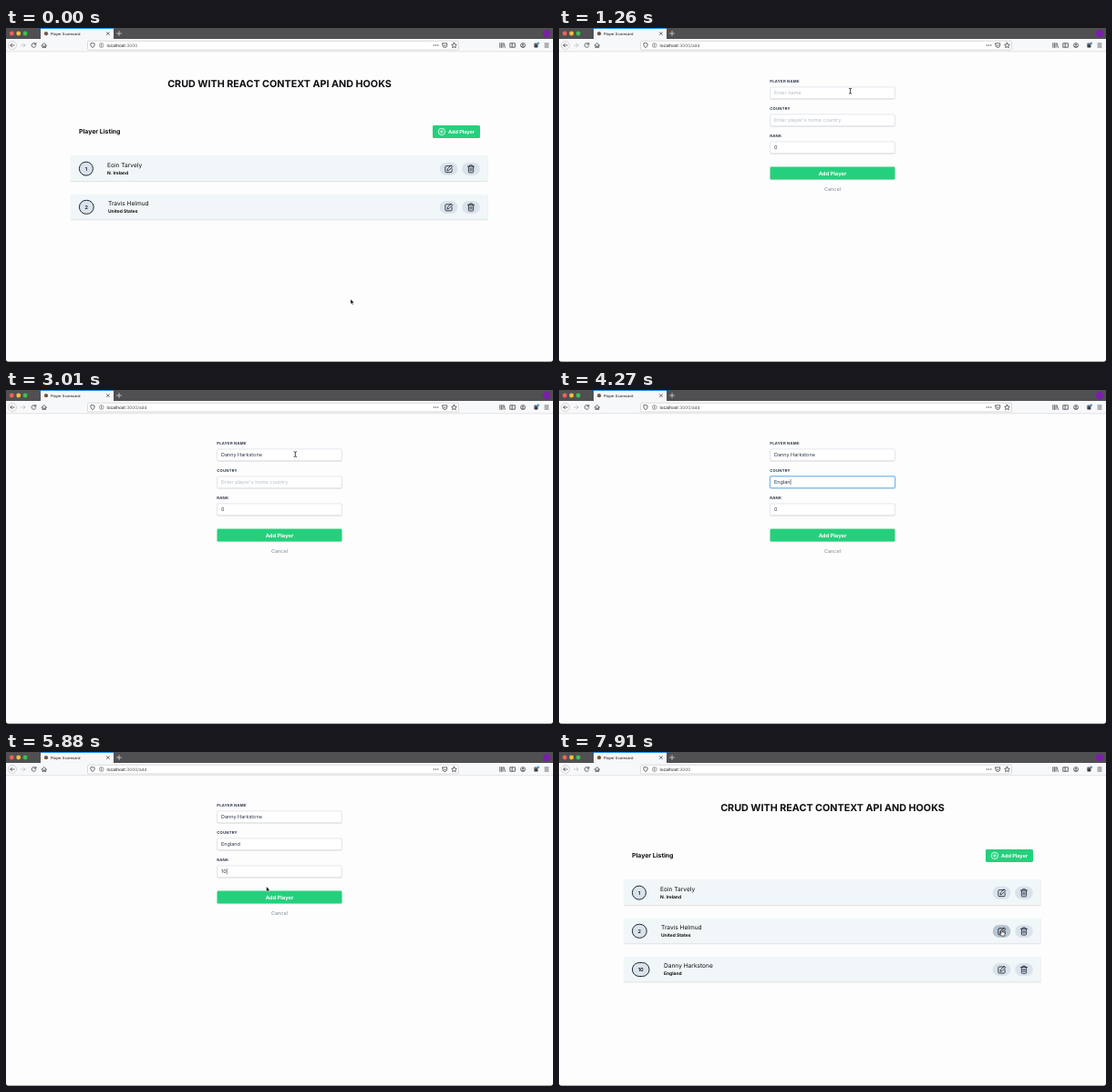
These frames come from a looping animation (600x367 px, 8 s). An HTML page:

```html
<!DOCTYPE html>
<html lang="en">
<head>
<meta charset="utf-8">
<title>Player Scorecard</title>
<style>
html, body { margin: 0; width: 100%; height: 100%; overflow: hidden; background: #fdfdfd; }
svg { display: block; width: 100vw; height: 100vh; }
text { font-family: Inter, "Open Sans", sans-serif; white-space: pre; fill: #0c0d10; text-rendering: geometricPrecision; }
.b { font-weight: 700; }
.s { font-weight: 600; }
.label { font-weight: 700; font-size: 4.2px; letter-spacing: .22px; fill: #2d3748; }
.field { font-size: 5.5px; }
.line { fill: none; stroke: #3a3a40; stroke-width: .75; stroke-linecap: round; stroke-linejoin: round; }
</style>
</head>
<body>
<svg id="stage" viewBox="0 0 600 367" preserveAspectRatio="none"></svg>
<script>
const LOOP = 8000, STEP = 70;
const GREEN = '#25d07d', DARK_GREEN = '#20bf72', PILL = '#dae3ec', DARK_PILL = '#b9c4d1';

const rect = (x, y, w, h, fill, r = 0, more = '') =>
  `<rect x="${x}" y="${y}" width="${w}" height="${h}" rx="${r}" fill="${fill}" ${more}/>`;
const dot = (x, y, r, fill, more = '') => `<circle cx="${x}" cy="${y}" r="${r}" fill="${fill}" ${more}/>`;
const line = (d, more = '') => `<path class="line" d="${d}" ${more}/>`;
const text = (x, y, size, str, cls = '', more = '') =>
  `<text x="${x}" y="${y}" font-size="${size}" class="${cls}" ${more}>${str}</text>`;
const at = (x, y, inner) => `<g transform="translate(${x} ${y}) scale(1.1)">${inner}</g>`;
const shadowed = (x, y, w, h, fill, r, edge) =>
  rect(x - .4, y + .2, w + .8, h + 1.1, '#000', r, 'opacity=".04"') +
  rect(x, y + .2, w, h + .5, '#000', r, 'opacity=".08"') +
  rect(x, y, w, h, fill, r, edge ? `stroke="${edge}" stroke-width=".7"` : '');

const chrome =
  rect(0, 0, 600, 12, '#505053') +
  ['#f9605a', '#f6bd3b', '#35c649'].map((c, i) => dot(6.3 + 7.4 * i, 6, 2.4, c)).join('') +
  rect(38, 0, 80, 12, '#f6f7f8') + rect(38, 0, 80, 1, '#2492f5') +
  dot(44, 6.2, 2.1, '#6e5a44') +
  text(49, 7.6, 4, 'Player Scorecard') +
  line('M110.3 4.6l3 3m0-3l-3 3') +
  line('M121.5 6h5m-2.5-2.5v5', 'style="stroke:#ddd"') +
  dot(593, 6, 4.3, '#7a1fa8') +
  rect(0, 12, 600, 14, '#f7f8f9') + rect(0, 25.6, 600, .6, '#d2d3d5') +
  dot(7, 19, 4.5, '#fff', 'stroke="#b8b8ba" stroke-width=".6"') +
  line('M9.3 19h-4.5m2-2l-2 2l2 2') +
  line('M16.5 19h4.5m-2-2l2 2l-2 2', 'opacity=".3"') +
  line('M32.6 17.7a2.4 2.4 0 1 0 .2 2M32.8 16.4v1.7h-1.8') +
  line('M39 19.2l2.8-2.6l2.8 2.6M40 18.8v2.7h1.2v-1.6h1.2v1.6h1.2v-2.7') +
  rect(89.5, 14.2, 407, 9.8, '#fff', 1.2, 'stroke="#c9cacc" stroke-width=".7"') +
  line('M95 16.5l2.1 .7v1.7q-.3 1.8-2.1 2.7q-1.8-.9-2.1-2.7v-1.7z') +
  dot(104.7, 19, 2.4, 'none', 'stroke="#666" stroke-width=".6"') + line('M104.7 18.8v1.2m0-2.3v0') +
  [469.4, 471.6, 473.8].map(x => dot(x, 19, .65, '#444')).join('') +
  line('M478.8 16.8h5v2q-.2 2.6-2.5 2.8q-2.3-.2-2.5-2.8zM480.1 18.7l1.2 1.2l1.2-1.2') +
  line('M491.5 16.2l.9 1.9l2 .2l-1.5 1.4l.4 2l-1.8-1l-1.8 1l.4-2l-1.5-1.4l2-.2z') +
  line('M541.8 16.6v4.8m1.6-4.8v4.8m1.6-4.8v4.8m1.2-4.6l1.2 4.6') +
  line('M553.2 16.8h5.2v4.4h-5.2zM555.2 17v4') +
  dot(567, 19, 2.5, 'none', 'stroke="#3a3a40" stroke-width=".7"') + dot(567, 18.3, .9, '#3a3a40') +
  line('M565.6 20.3h2.8') +
  rect(579.4, 18.2, 4, 3.3, '#3a3a40', .4) + line('M579.2 17.8h4.4m-2.2 0l-1-1.3m1 1.3l1-1.3') +
  dot(583.8, 16.8, 1.2, '#3599f2') +
  line('M591 17h4m-4 2h4m-4 2h4');

function row(i, rank, name, country, pillWidth, nameX) {
  const y = 140.5 + 42.2 * i;
  const pencil = line('M3 -2.9h-5a1 1 0 0 0-1 1v4.4a1 1 0 0 0 1 1h4.6a1 1 0 0 0 1-1v-2.6M3 -3.4l1.2 1.2l-3.7 3.7l-1.6.4l.4-1.6z', 'transform="translate(-.4 0)" style="stroke:#1a202c"');
  const bin = line('M-3.2 -2.4h6.4M-1.2 -2.5v-1.1h2.4v1.1M-2.4 -2.3v5.2a.9 .9 0 0 0 .9 .9h3a.9 .9 0 0 0 .9-.9v-5.2M-.8 -.7v2.8M.8 -.7v2.8', 'style="stroke:#1a202c"');
  return `<g id="row${i}">` + shadowed(71, y, 457.5, 27.6, '#f1f7f8', 1) +
    rect(80.4, y + 6.6, pillWidth, 15, PILL, 7.5, 'stroke="#1f2733" stroke-width="1"') +
    text(80.4 + pillWidth / 2, y + 16.3, 5.5, rank, 's', 'text-anchor="middle"') +
    text(nameX, y + 12.2, 6.6, name) + text(nameX, y + 20.2, 4.95, country, 'b') +
    rect(475.7, y + 7.2, 19.7, 14, PILL, 7, `id="edit${i}"`) + at(485.6, y + 14.3, pencil) +
    rect(500.2, y + 7.2, 19.7, 14, PILL, 7) + at(510, y + 14.2, bin) + '</g>';
}

const list = '<g id="list">' +
  text(300, 65, 10.75, 'CRUD WITH REACT CONTEXT API AND HOOKS', 'b', 'text-anchor="middle"') +
  text(80, 116.2, 6.9, 'Player Listing', 'b') +
  rect(468, 107, 52, 14, GREEN, 1.4, 'id="open"') +
  dot(477.9, 113.9, 3.7, 'none', 'stroke="#fff" stroke-width=".8"') +
  line('M476.2 113.9h3.4m-1.7-1.7v3.4', 'style="stroke:#fff"') +
  text(485, 115.9, 5.5, 'Add Player', 'b', 'style="fill:#fff"') +
  row(0, 1, 'Eoin Tarvely', 'N. Ireland', 15, 111) +
  row(1, 2, 'Travis Helmud', 'United States', 15.8, 112) +
  row(2, 10, 'Danny Harkstone', 'England', 18.6, 115) + '</g>';

const form = '<g id="form">' +
  ['PLAYER NAME', 'COUNTRY', 'RANK'].map((label, i) => {
    const y = 64.9 + 30 * i;
    return text(231.3, y - 4.9, 4.2, label, 'label') +
      shadowed(231.6, y, 136.9, 12.8, '#fff', 1.6, '#d9dfe7') +
      text(236, y + 8.4, 5.5, '', 'field', `id="field${i}"`);
  }).join('') +
  '<g id="ring">' + rect(231.3, 94.6, 137.5, 13.3, 'none', 1.8, 'stroke="#cbe4f8" stroke-width="1.8"') +
  rect(231.5, 94.8, 137.1, 12.9, 'none', 1.6, 'stroke="#62aee8" stroke-width=".8"') + '</g>' +
  rect(0, 0, .5, 6.4, '#222', 0, 'id="caret"') +
  rect(231.5, 153, 137, 14.4, '#000', 1.6, 'opacity=".06"') +
  rect(231.5, 152.5, 137, 14.1, GREEN, 1.4, 'id="send"') +
  text(300, 161.6, 5.8, 'Add Player', 'b', 'text-anchor="middle" style="fill:#fff"') +
  text(300, 178.7, 5.5, 'Cancel', '', 'text-anchor="middle" style="fill:#7f8b9b"') + '</g>';

const pointers =
  '<path id="arrow" d="M0 0v5.3l1.2-1.1l.8 1.9l1-.4l-.8-1.9h1.7z" fill="#000" stroke="#fff" stroke-width=".4"/>' +
  line('M-1.2 -2.9q1 0 1.2.7q.2-.7 1.2-.7M0 -2.2v4.4M-1.2 2.9q1 0 1.2-.7q.2.7 1.2.7', 'id="beam" style="stroke:#111"') +
  '<path id="hand" d="M-.6 -1.2q.7-.7 1.3 0v2l2.4.6q.7.3.5 1.1l-.5 2.6h-3.3l-2-2.7q.2-.9 1.6.1z" fill="#fff" stroke="#111" stroke-width=".6"/>';

document.getElementById('stage').innerHTML =
  rect(0, 0, 600, 367, '#fdfdfd') + chrome +
  text(110.6, 20.7, 4.75, '', '', 'id="url"') + list + form +
  rect(0, 366.3, 600, .7, '#8a8a8c') + '<path d="M0 364v3h3q-3 0-3-3M600 364v3h-3q3 0 3-3"/>' +
  `<g id="pointer">${pointers}</g>`;

const el = id => document.getElementById(id);
const show = (id, on) => el(id).style.display = on ? '' : 'none';
const paint = (id, colour) => el(id).setAttribute('fill', colour);

// time, x, y, pointer shape from then on
const path = [
  [0, 378, 298, 'arrow'], [70, 378, 298, 'arrow'], [490, 484, 116, 'hand'], [630, 484, 114, 'arrow'],
  [700, 484, 114, 'arrow'], [980, 319.6, 69.2, 'beam'], [1330, 319.6, 69.2, ''],
  [2940, 319.6, 69.2, 'beam'], [3010, 317.3, 70.6, 'beam'], [3290, 290, 101, 'beam'], [3570, 290, 101, ''],
  [4690, 290, 101, 'beam'], [4900, 285, 131, 'beam'], [5250, 285, 131, ''], [5530, 285, 131, 'beam'],
  [5740, 285, 131, 'beam'], [5880, 285.6, 148, 'arrow'], [5950, 286.5, 153, 'hand'], [6160, 288.8, 156.5, 'hand'],
  [6440, 288.8, 156.5, 'arrow'], [7350, 288.8, 156.5, 'arrow'], [7630, 400, 117, 'arrow'],
  [7840, 483, 192, 'hand'], [7910, 485.6, 197, 'hand'], [LOOP, 485.6, 197, 'hand']
];
const nameKeys = [1330, 1470, 1540, 1610, 1680, 1820, 1890, 2100, 2240, 2310, 2450, 2660, 2730, 2800, 2870];
const countryKeys = [3570, 3780, 3920, 4060, 4200, 4270, 4410];
const typed = (str, keys, t) => str.slice(0, keys.filter(k => k <= t).length);

function setField(i, value, hint) {
  const field = el('field' + i);
  field.textContent = value || hint;
  field.style.fill = value ? '#2d3748' : '#b4bdc9';
}

function movePointer(t) {
  const i = path.findIndex(p => p[0] > t) - 1;
  const [t0, x0, y0, shape] = path[i], [t1, x1, y1] = path[i + 1];
  const u = (t - t0) / (t1 - t0), k = u * u * (3 - 2 * u);
  el('pointer').setAttribute('transform', `translate(${x0 + (x1 - x0) * k} ${y0 + (y1 - y0) * k})`);
  for (const id of ['arrow', 'beam', 'hand']) show(id, id === shape);
  return shape;
}

function draw(t) {
  const adding = t >= 630 && t < 6370;
  show('list', !adding);
  show('form', adding);
  show('row2', t >= 6370);
  el('url').innerHTML = 'localhost<tspan style="fill:#555">:3000' + (adding ? '/add' : '') + '</tspan>';

  const hover = movePointer(t) === 'hand';
  paint('open', hover && t < 630 ? DARK_GREEN : GREEN);
  paint('send', hover && t < 6370 ? DARK_GREEN : GREEN);
  paint('edit1', hover && t > 7000 ? DARK_PILL : PILL);
  if (!adding) return;

  setField(0, typed('Danny Harkstone', nameKeys, t), 'Enter name');
  setField(1, typed('England', countryKeys, t), "Enter player's home country");
  setField(2, t < 5250 ? '0' : typed('10', [5390, 5530], t), '');
  el('ring').style.opacity = t < 4900 ? Math.min(1, Math.max(0, (t - 3290) / 140)) : 0;

  const focus = t < 3360 ? 0 : t < 4900 ? 1 : 2;
  const blank = focus === 1 && t < 3570;
  show('caret', t >= 1330 && (t < 2940 || t >= 3360));
  el('caret').setAttribute('x', 236.2 + (blank ? 0 : el('field' + focus).getComputedTextLength()));
  el('caret').setAttribute('y', 68 + 30 * focus);
}

function tick() {
  draw(Math.floor(performance.now() % LOOP / STEP) * STEP);
  requestAnimationFrame(tick);
}
tick();
</script>
</body>
</html>
```
